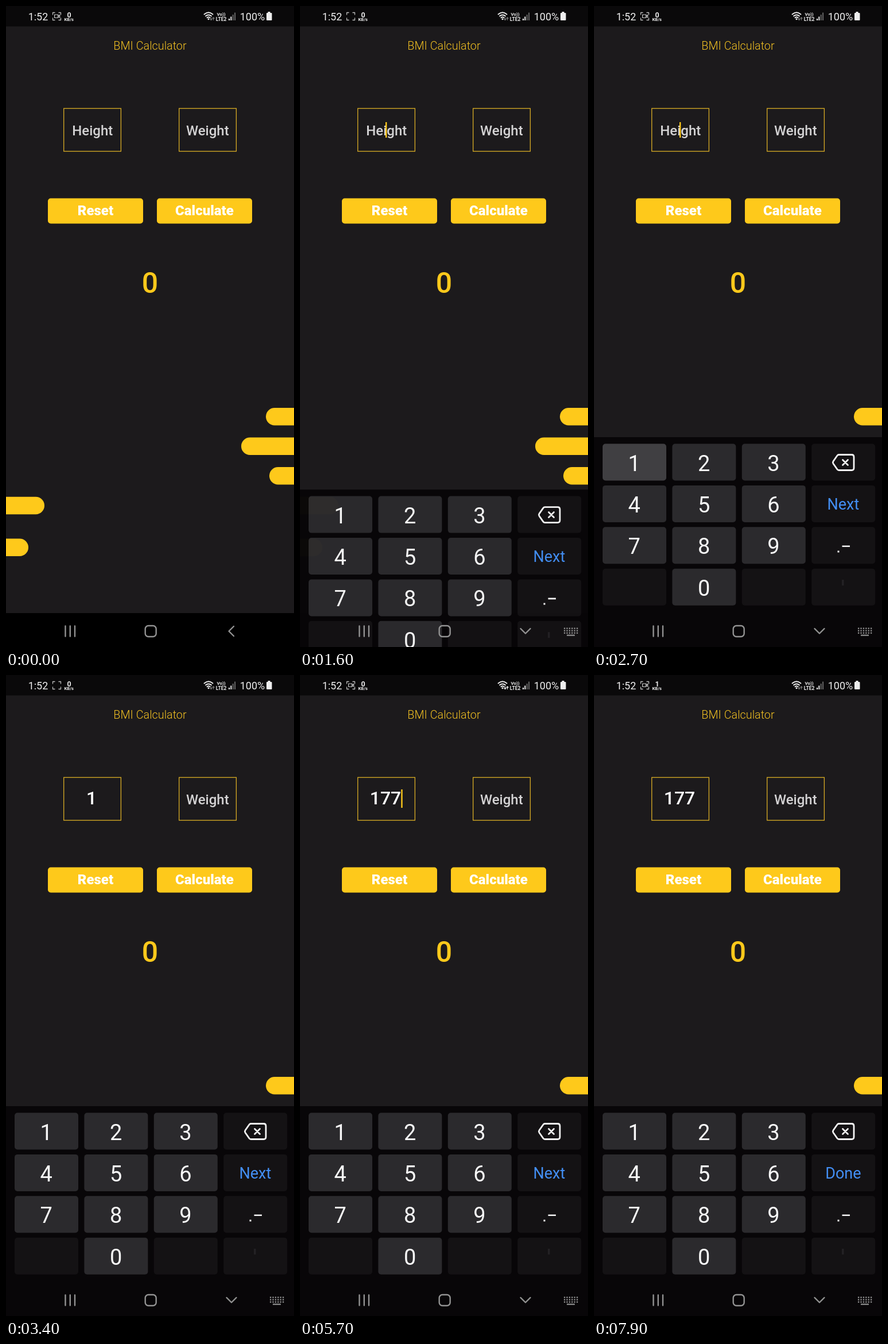
Recreate the animation shown at these times as an HTML page. Size 502 px wide and 1115 px high, loop 8 s.

```html
<!DOCTYPE html>
<html lang="en">
<head>
<meta charset="utf-8">
<title>BMI Calculator</title>
<style>
  html, body { margin: 0; width: 100%; height: 100%; overflow: hidden; background: #000; }
  svg { display: block; width: 100vw; height: 100vh; font-family: Roboto, sans-serif; }
  text { text-anchor: middle; }
  .line { fill: none; stroke-linecap: round; stroke-linejoin: round; }
</style>
</head>
<body>
<svg viewBox="0 0 502 1115">
  <rect width="502" height="1115" fill="#1c1a1c"/>
  <rect width="502" height="35.5" fill="#0a090a"/>

  <g id="status" fill="#eee">
    <text x="56" y="25" font-size="18">1:52</text>
    <path class="line" stroke="#bbb" stroke-width="1.3" d="M81.5 15v-3.500h3.500M92 11.500h3.500v3.500M95.500 21v3.500h-3.500M85 24.500h-3.500v-3.500"/>
    <path id="camera" class="line" stroke="#ccc" stroke-width="1.2" d="M84.600 15h6v5.500h-6zM90.600 17.500l3-2v4.500l-3-2"/>
    <text id="speed" x="110" y="19.500" font-size="12.500" font-weight="700">0</text>
    <text x="109.700" y="26" font-size="7.600" font-weight="700">KB/s</text>
    <g class="line" stroke="#eee" stroke-width="1.900">
      <path d="M345.500 14.500q7.500-6.500 15 0M348 17.500q5-4.200 10 0M350.500 20.300q2.500-2 5 0"/>
    </g>
    <circle cx="353" cy="22.800" r="1.500"/>
    <path id="arrows" class="line" stroke-width="1.200" d="M357.500 20v4.500l-1.500-1.500m1.500 1.500l1.500-1.500M361.500 24.500v-4.500l-1.500 1.500m1.500-1.500l1.500 1.500"/>
    <text x="375" y="17" font-size="8" font-weight="700">Vo))</text>
    <text x="375" y="25.500" font-size="8.500" font-weight="700">LTE2</text>
    <path d="M388 22h2v3h-2zM391.300 18.500h2v6.500h-2z"/>
    <path fill="#666" d="M394.700 15h2v10h-2zM398.100 11.500h2v13.500h-2z"/>
    <text x="429.500" y="25" font-size="18">100%</text>
    <path d="M456.500 10h4v2h2q1 0 1 1v11q0 1-1 1h-7.500q-1 0-1-1v-11q0-1 1-1h1.500z"/>
  </g>

  <text x="251" y="76" font-size="19.800" font-weight="300" fill="#f0bf22">BMI Calculator</text>
  <g fill="none" stroke="#d9ad25" stroke-width="1.300">
    <rect x="100.700" y="178.200" width="99.700" height="74.500"/>
    <rect x="301.700" y="178.200" width="99.700" height="74.500"/>
  </g>
  <text id="height"></text>
  <text x="351.300" y="225" font-size="24" font-weight="500" fill="#d3d2d3">Weight</text>
  <rect id="cursor" width="2.400" fill="#fec91b"/>

  <g fill="#fec91b">
    <rect x="73" y="334.500" width="166" height="44" rx="5"/>
    <rect x="263" y="334.500" width="166" height="44" rx="5"/>
    <rect x="453" y="699" width="80" height="30.500" rx="15.250"/>
    <rect x="410" y="750.500" width="120" height="30.500" rx="15.250"/>
    <rect x="459" y="802" width="80" height="30.500" rx="15.250"/>
    <rect x="-40" y="853.700" width="107" height="30.500" rx="15.250"/>
    <rect x="-40" y="926.500" width="79" height="30.500" rx="15.250"/>
    <text x="251" y="499" font-size="50" font-weight="500">0</text>
  </g>
  <g font-size="24" font-weight="900" fill="#fff">
    <text x="156" y="364">Reset</text>
    <text x="346" y="364">Calculate</text>
  </g>

  <rect y="1056" width="502" height="59" fill="#000"/>
  <g id="keyboard">
    <rect y="750" width="502" height="366" fill="#080608"/>
    <g id="keys"></g>
    <path class="line" stroke="#f5f5f5" stroke-width="2.800" d="M427 780.500h22q4 0 4 4v19q0 4-4 4h-22q-2 0-3-1.500l-7-10q-1.300-2 0-4l7-10q1-1.500 3-1.500zM433.500 789.500l9 9m0-9l-9 9"/>
    <path fill="#f5f5f5" d="M424.500 947.500h3v3h-3zM432.500 938.500h13.500v2.600h-13.500z"/>
    <rect x="432" y="998" width="3.500" height="10" fill="#232124"/>
  </g>

  <g class="line" stroke="#929292" stroke-width="2.400">
    <path d="M103.500 1078.500v18M111.800 1078.500v18M120 1078.500v18"/>
    <rect x="242.700" y="1078" width="19" height="19" rx="5.500"/>
    <path id="back"/>
  </g>
  <g id="switcher" fill="#929292"></g>
</svg>

<script>
const LOOP = 8000, STEP = 100;
const $ = id => document.getElementById(id);
const set = (el, attrs) => Object.entries(attrs).forEach(([k, v]) => el.setAttribute(k, v));
const show = (el, on) => set(el, { visibility: on ? 'visible' : 'hidden' });
const within = (t, [from, to]) => t >= from && t < to;

const presses = { 1: [[2700, 2900]], 7: [[4100, 4300], [4500, 4700]], Next: [[6800, 7400]] };
const typing = [[2900, '1'], [4300, '17'], [4700, '177']];
const FOCUS_HEIGHT = 1400, FOCUS_WEIGHT = 7400;

const layout = ['1', '2', '3', '', '4', '5', '6', 'Next', '7', '8', '9', '', '', '0', '', ''];
$('keys').innerHTML = layout.map((label, i) => {
  const x = 15 + i % 4 * 121.4, y = 761.5 + (i >> 2) * 72.4;
  const word = label === 'Next';
  return `<rect x="${x}" y="${y}" width="111" height="64" rx="5"/>
    <text x="${x + 55.2}" y="${y + (word ? 114.5 - 72.4 : 47)}" font-size="${word ? 27 : 38}">${label}</text>`;
}).join('');
const keyShapes = [...$('keys').querySelectorAll('rect')];
const keyLabels = [...$('keys').querySelectorAll('text')];

let dots = '';
for (let row = 0; row < 3; row++)
  for (let col = 0; col < 6; col++)
    dots += `<rect x="${460 + col * 4.4}" y="${1081.5 + row * 4}" width="2.3" height="2.3"/>`;
$('switcher').innerHTML = dots + '<rect x="465" y="1093.5" width="14" height="2.2"/>';

function drawKeys(t) {
  layout.forEach((label, i) => {
    const pressed = (presses[label] || []).some(span => within(t, span));
    const word = label === 'Next';
    const idle = label && !word ? '#2b2a2d' : '#141214';
    set(keyShapes[i], { fill: pressed ? '#403f42' : idle });
    set(keyLabels[i], { fill: word && !pressed ? '#438ff5' : '#f8f8f8' });
    if (word) keyLabels[i].textContent = t < FOCUS_WEIGHT ? 'Next' : 'Done';
  });
}

function drawInput(t) {
  const last = typing.filter(([at]) => t >= at).pop();
  const value = last ? last[1] : '';
  const field = $('height');
  field.textContent = value || 'Height';
  set(field, value
    ? { x: 149, y: 225, 'font-size': 32, 'font-weight': 500, fill: '#fff' }
    : { x: 150.7, y: 225, 'font-size': 24, 'font-weight': 500, fill: '#d3d2d3' });

  // The caret blink restarts whenever a field gains focus or text.
  const restart = t >= FOCUS_WEIGHT ? FOCUS_WEIGHT : last ? last[0] : FOCUS_HEIGHT;
  show($('cursor'), t >= FOCUS_HEIGHT && (t - restart) % 1000 < 500);
  if (t >= FOCUS_WEIGHT) set($('cursor'), { x: 350, y: 202, height: 27 });
  else if (value) set($('cursor'), { x: 149 + value.length * 9.1, y: 199, height: 32 });
  else set($('cursor'), { x: 149, y: 202, height: 27 });
}

function draw(t) {
  show($('camera'), (t + 800) % 1000 >= 500);
  $('speed').textContent = t < 7000 ? '0' : '1';
  set($('arrows'), { stroke: within(t, [5000, 7500]) ? '#eee' : '#777' });

  const open = t >= 1500;
  const progress = Math.min(1, Math.max(0, (t - 1450) / 350));
  const drop = 365 * (1 - progress) ** 2.48;
  show($('keyboard'), open);
  set($('keyboard'), { transform: `translate(0 ${drop})`, opacity: Math.min(1, 0.6 + progress * 0.9) });
  show($('switcher'), open);
  set($('back'), { d: open ? 'M384.500 1083l8.500 8.500 8.500-8.500' : 'M397 1079l-8.500 8.500 8.500 8.500' });

  drawKeys(t);
  drawInput(t);
}

function frame() {
  draw(Math.floor(performance.now() % LOOP / STEP) * STEP);
  requestAnimationFrame(frame);
}
frame();
</script>
</body>
</html>
```
